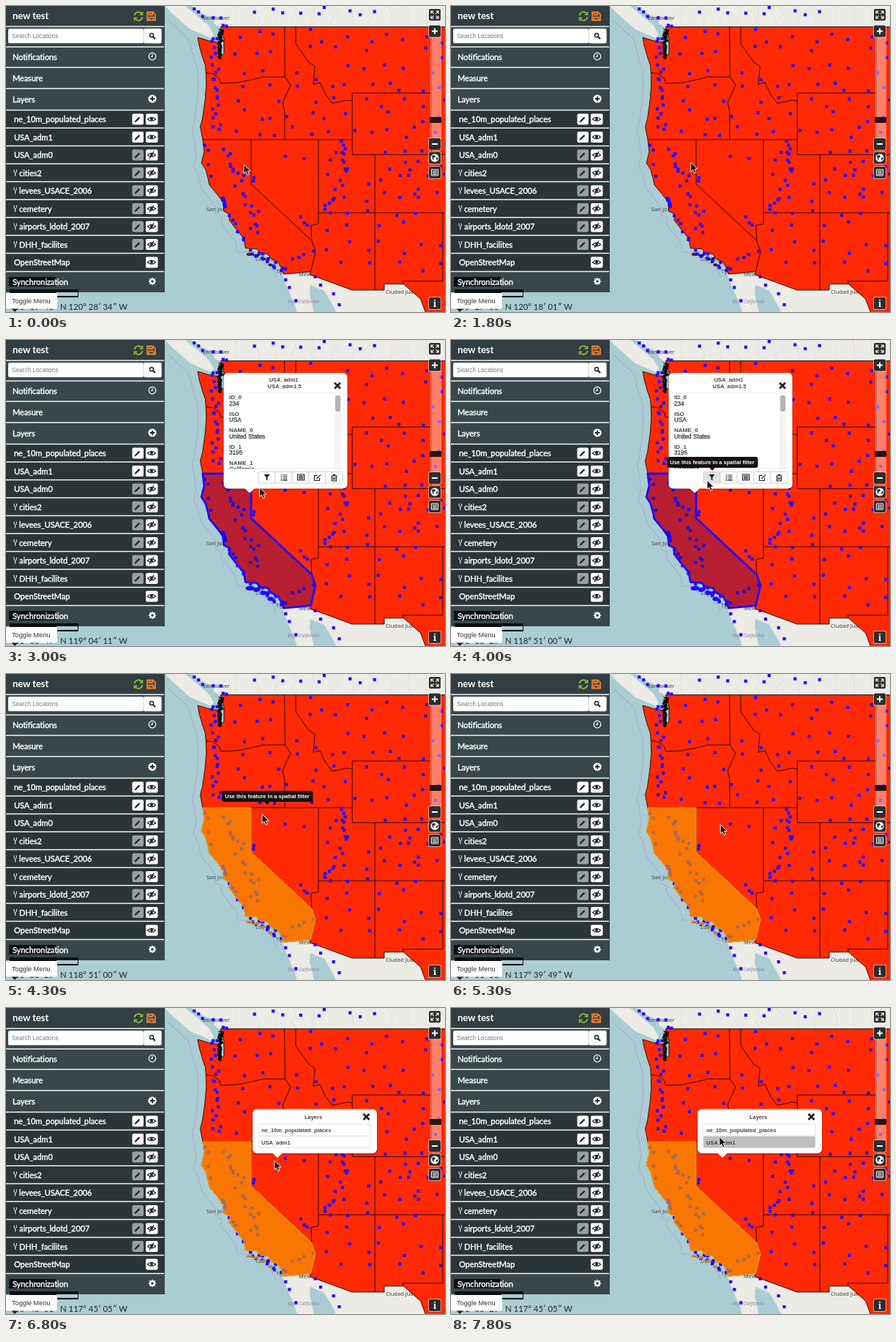
An HTML page for the animation above (8 s loop, 600 by 419 pixels).

```html
<!DOCTYPE html>
<html lang="en">
<head>
<meta charset="utf-8">
<title>Map client</title>
<style>
  html, body { margin: 0; width: 100%; height: 100%; overflow: hidden; background: #a9cdd2; }
  svg { display: block; position: absolute; left: 0; top: 0; }
  text { white-space: pre; }
  .ui { font: 11px Lato, sans-serif; letter-spacing: -.08px; fill: #fff; stroke: #fff; stroke-width: .4px; }
  .sm { font: 8.2px "Liberation Sans", Arial, sans-serif; fill: #333; }
  .val { stroke: #333; stroke-width: .25px; }
  .b { font: bold 7.5px "Liberation Sans", Arial, sans-serif; fill: #444; }
  .place { font: 7.5px "Noto Sans", sans-serif; fill: #444; }
  .line { fill: none; stroke: #1c0500; stroke-width: .9px; stroke-linejoin: round; }
  .ico { fill: none; stroke: #222; stroke-width: 1.2px; }
  .inv { stroke: #fff; }
</style>
</head>
<body>
<svg id="stage" width="600" height="419" viewBox="0 0 600 419"></svg>
<script>
const LOOP = 8000;

const path = (pts, attrs, close = true) =>
  `<path d="M${pts.join(' ')}${close ? 'Z' : ''}" ${attrs}/>`;
const rect = (x, y, w, h, fill, r = 0, more = '') =>
  `<rect x="${x}" y="${y}" width="${w}" height="${h}" rx="${r}" fill="${fill}" ${more}/>`;
const text = (x, y, s, cls, more = '') =>
  `<text x="${x}" y="${y}" class="${cls}" ${more}>${s}</text>`;
const at = (x, y, body) => `<g transform="translate(${x} ${y})">${body}</g>`;
const ico = (d, cls = '', more = '') => `<path d="${d}" class="ico ${cls}" ${more}/>`;
const hline = y => rect(0, y - .7, 216, 1.5, '#eef2f2');

// Web Mercator: degrees west and north to stage pixels
const merc = lat => Math.log(Math.tan(Math.PI / 4 + lat * Math.PI / 360));
const geo = pts => pts.map((v, i) => +(i % 2
  ? 183 + (merc(42) - merc(v)) * 884.6
  : 335 + (120 - v) * 15.44).toFixed(1));

let seed = 11;
const rnd = () => (seed = (seed * 16807) % 2147483647) / 2147483647;
const jitter = r => (rnd() + rnd() - 1) * r;

// ---------- map ----------
const northCoast = geo([122.7,49, 122.4,48.3, 122.4,47.4, 122.8,47.2, 122.9,48.1, 123.6,48.15, 124.72,48.38,
  124.6,47.9, 124.3,47.2, 124.05,46.7, 124,46.25, 123.97,45.5, 124.07,44.6, 124.3,43.4, 124.5,42.84, 124.28,42]);
const caCoast = geo([124.28,42, 124.15,41.2, 124.4,40.44, 124.02,40, 123.78,39.3, 123.7,38.95, 123,38.3,
  122.5,37.75, 122.4,37.1, 121.85,36.9, 121.95,36.5, 121.4,35.9, 120.65,35.15, 120.5,34.45,
  119.5,34.4, 119.2,34.1, 118.5,34.02, 118.35,33.75, 117.6,33.4, 117.25,32.85, 117.12,32.53]);
const caEast = geo([114.72,32.72, 114.5,33.5, 114.3,34.2, 114.63,35, 120,39, 120,42]);
const california = caCoast.concat(caEast);
const south = geo([117.12,32.53, 114.72,32.72, 114.81,32.5, 111.07,31.33, 108.21,31.33, 108.21,31.78, 106.5,31.78,
  105,30.65, 104.5,29.5, 102.7,29.5, 102.7,49]);
const borders = [
  [124,46.25, 123.4,46.2, 122.8,45.9, 122.7,45.6, 121.2,45.65, 119.3,45.93, 119,46, 117,46],
  [117.04,49, 117,46, 116.5,45.5, 117.2,44.4, 117.03,43.8, 117.03,42],
  [116.05,49, 116.05,48, 114.9,46.9, 114.35,46.65, 114.5,45.55, 113.9,45.65, 113.4,44.9, 112.8,44.35,
    111.5,44.55, 111.05,44.5],
  [124.28,42, 111.05,42, 111.05,45, 104.05,45, 104.05,49],
  [111.05,42, 111.05,41, 102,41], [104.05,45, 104.05,41],
  [114.04,42, 114.04,36.2, 114.7,36.1, 114.63,35], [114.04,37, 102,37],
  [109.05,41, 109.05,31.33], [103.04,37, 103.04,32, 106.6,32, 106.5,31.78]
].map(geo).concat([caEast]);

const islands = attrs => [0, 1, 2, 3].map(i =>
  `<ellipse cx="${333 + 9.5 * i}" cy="${340 + 1.6 * i * i}" rx="${4.2 - i * .5}" ry="1.5" ${attrs}/>`).join('');

// Towns: a loose lattice inland plus crowded corridors
const dot = (x, y) => rect((x - 2.1).toFixed(1), (y - 2.1).toFixed(1), 4.2, 4.2, '#2408ff');
const along = (x1, y1, x2, y2, n, spread) => {
  let s = '';
  for (let i = 0; i < n; i++) {
    const k = (i + rnd() * .6) / n;
    s += dot(x1 + (x2 - x1) * k + jitter(spread), y1 + (y2 - y1) * k + jitter(spread));
  }
  return s;
};
const lattice = () => {
  let s = '';
  for (let y = 42; y < 400; y += 22)
    for (let x = 318; x < 600; x += 25) {
      const px = x + jitter(13), py = y + jitter(12);
      const desert = px < 432 && py > 180;
      if (!desert && py < 340 + (px - 400) / 4 && rnd() < .82) s += dot(px, py);
    }
  return s;
};
const towns = () => lattice() +
  along(255, 4, 310, 28, 7, 6) + along(335, 8, 520, 8, 9, 7) +
  along(286, 38, 289, 178, 22, 8) + along(272, 185, 280, 240, 4, 4) +
  along(300, 195, 348, 312, 23, 9) + along(296, 262, 302, 277, 9, 2.5) + along(304, 284, 328, 325, 6, 4) +
  along(336, 332, 382, 364, 15, 6) + along(388, 348, 422, 338, 4, 4) +
  along(461, 185, 464, 232, 8, 3) + along(458, 240, 436, 284, 6, 6) + along(548, 212, 566, 270, 6, 8) +
  along(339, 234, 338, 241, 2, 0) + along(370, 205, 432, 210, 2, 2) + along(404, 290, 413, 304, 3, 3) +
  along(381, 372, 400, 410, 3, 3) + along(416, 370, 470, 412, 4, 6);

const sound = () => {
  let s = '';
  for (let k = 0; k < 9; k++) {
    const p = [];
    for (let y = 31; y < 72; y += 2.5)
      p.push((289 + (y < 48 ? 9 : 6) * rnd()).toFixed(1), (y + 2 * rnd()).toFixed(1));
    s += path(p, 'fill="none" stroke="#000" stroke-width=".9"', false);
  }
  return s;
};
const roads = () => {
  let s = '';
  for (let x = 315; x < 600; x += 26)
    s += path([x, 0, x + 12 * rnd(), 10, x - 8 + 16 * rnd(), 20, x + 8 * rnd(), 28],
      'fill="none" stroke="#dcdad4" stroke-width=".8"', false);
  return s;
};

const LAND = 'fill="#ecebe6" stroke="#d6d6d6" stroke-width=".6"';
const waters = northCoast.slice(12).concat(caCoast).map((v, i) => v + (i % 2 ? 5 : -11));
const map =
  rect(0, 0, 600, 419, '#a9cdd2') +
  path([222, 20, 249, 45].concat(waters), 'fill="none" stroke="#b3a5cb" stroke-width="1.2" opacity=".8" stroke-linejoin="round"', false) +
  path([217,0, 228,11, 252,32, 280,44, 284,39, 277,27, 262,14, 244,-1], LAND) +
  path([252,-1, 264,8, 284,17, 284,24, 292,29, 601,30, 601,-1], LAND) + roads() +
  path([378,367, 383,382, 395,410, 398,420, 421,420, 415,394, 416,382, 435,390, 448,412, 451,420, 601,420, 601,366], LAND) +
  text(287, 19, 'Vancouver', 'place', 'text-anchor="middle"') +
  text(274, 281, 'San Jose', 'place') + text(369, 366, 'Tijuana', 'place') +
  text(400, 370, 'Mexicali', 'place') + text(519, 394, 'Ciudad Juárez', 'place') +
  text(385, 407, 'Baja California', 'place', 'style="font-style:italic;font-size:6.5px;fill:#8c84a4"') +
  text(341, 349, 'Los Angeles', 'place') +
  path(northCoast.concat(caCoast, south), 'fill="#ff2a03" stroke="#1c0500" stroke-width=".9" stroke-linejoin="round"') +
  borders.map(b => path(b, 'class="line"', false)).join('') +
  islands('fill="#5a1a10" stroke="#111" stroke-width=".8"') + sound() + towns();

const highlight = (id, attrs) =>
  `<g id="${id}" stroke-linejoin="round" ${attrs}>${path(california, '')}${islands('')}</g>`;

// ---------- icons ----------
const pencil = ico('M4.5 10.5L10 5', '', 'style="stroke-width:2.4px"') + ico('M3.4 11.6L5 10');
const eye = ico('M2.5 7.5Q8 2.2 13.5 7.5Q8 12.3 2.5 7.5Z') + '<circle cx="8" cy="7.2" r="2" fill="#222"/>';
const fork = ico('M1 0V2Q1 4 2.6 5Q4.4 4 4.4 2V0M2.7 4.8V9', 'inv', 'style="stroke-width:1px"');
const cross = ico('M0 0L8 8M8 0L0 8', '', 'style="stroke-width:2.6px"');
const trash = 'M0 2H8M3 2V.4H5V2M1 2V9H7V2M3 4V7.4M5 4V7.4';
const list = 'M0 1H2M3 1H9M0 3.5H2M3 3.5H9M0 6H2M3 6H9M0 8.2H2M3 8.2H9';
const table = 'M0 0H9V8H0ZM1.5 2.2H7.5M1.5 4.2H7.5M1.5 6.2H7.5';
const gear = () => {
  let s = '<circle r="2.9" class="ico inv" style="stroke-width:2.2px"/>';
  for (let a = 0; a < 360; a += 45) s += `<path d="M3 0H5.3" class="ico inv" stroke-width="2" transform="rotate(${a})"/>`;
  return s;
};

// ---------- sidebar ----------
const branches = ['cities2', 'levees_USACE_2006', 'cemetery', 'airports_ldotd_2007', 'DHH_facilites'];
const layers = ['ne_10m_populated_places', 'USA_adm1', 'USA_adm0', ...branches, 'OpenStreetMap'];
const layerRow = (name, i) => {
  const y = 142.5 + i * 24.5, branch = branches.includes(name);
  const base = name === 'OpenStreetMap', on = i < 2 || base;
  return hline(y) + (branch ? at(10, y + 8, fork) : '') + text(branch ? 18 : 11, y + 16.5, name, 'ui') +
    (base ? '' : at(172.5, y + 5, rect(0, 0, 15.5, 15, on ? '#fff' : '#9b9f9f', 2) + pencil)) +
    at(191, y + 5, rect(0, 0, 16.5, 15, '#fff', 2) + eye + (on ? '' : ico('M5 12.5L11 2.5')));
};
const sidebar =
  rect(0, 0, 217, 392, '#39474a') + rect(0, 0, 217, 29, '#323e41') + rect(0, 142, 217, 221, '#2b3437') +
  text(9, 18, 'new test', 'ui', 'style="font-size:13px;font-weight:bold;stroke:none"') +
  at(181, 14, ico('M-5.5 -1A5.5 5.5 0 0 1 4 -4M5.5 1A5.5 5.5 0 0 1 -4 4M5.5 -6V-2.4H1.8M-5.5 6V2.4H-1.8', '',
    'style="stroke:#8fc63d;stroke-width:1.7px"')) +
  at(192, 7.5, ico('M1 1H9L12 4V12H1ZM3.5 1V4.5H8V1M3.5 12V8H9.5V12', '', 'style="stroke:#f08030;stroke-width:1.8px"')) +
  rect(3, 31, 185, 20, '#fff', 2) + text(8, 44, 'Search Locations', 'sm', 'style="fill:#777"') +
  rect(188, 31, 24.5, 20, '#fff', 2, 'stroke="#bbb" stroke-width=".7"') +
  at(199, 40, '<circle r="2.6" class="ico" style="stroke-width:1.5px"/>' + ico('M2 2L5 5', '', 'style="stroke-width:1.9px"')) +
  [28, 56, 84, 113, 363.5].map(hline).join('') +
  ['Notifications', 'Measure', 'Layers'].map((s, i) => text(9, 74 + 29 * i, s, 'ui')).join('') +
  at(200, 69, '<circle r="4.8" class="ico inv"/>' + ico('M0 -3V.5H-2.4', 'inv')) +
  at(200, 127, '<circle r="5.6" fill="#fff"/>' + ico('M-3.2 0H3.2M0 -3.2V3.2', '', 'style="stroke-width:1.8px"')) +
  layers.map(layerRow).join('') +
  rect(4, 371, 64, 13, '#0b0f10', 1) + rect(5, 388, 94, 11, '#0b0f10', 1) + rect(69, 392, 29, 5, '#a9cdd2') +
  text(9, 382, 'Synchronization', 'ui') + at(200, 377, gear()) +
  text(166, 416, '', '', 'id="coords" text-anchor="end" style="font:11.3px Lato,sans-serif;fill:#222"') +
  path([6, 413, 18, 413, 12, 419], 'fill="#222"') +
  rect(0, 393, 70, 21.5, '#fff', 2) + text(8, 406.5, 'Toggle Menu', 'sm', 'style="font-size:9.2px"');

// ---------- map controls ----------
const key = (y, body) => at(578, y, rect(-1, -1, 18, 18, '#fff', 3, 'opacity=".55"') +
  rect(0, 0, 16, 16, '#2d2d2d', 2) + body);
const thick = 'style="stroke-width:2px"';
const controls =
  rect(580, 42, 15, 140, '#fff', 0, 'opacity=".4"') +
  key(4, ico('M3 6.5V3H6.5M9.5 3H13V6.5M13 9.5V13H9.5M6.5 13H3V9.5M3 3L6.6 6.6M13 3L9.4 6.6M13 13L9.4 9.4M3 13L6.6 9.4', 'inv')) +
  key(26.5, ico('M4 8H12M8 4V12', 'inv', thick)) + rect(579, 152, 16, 8, '#241512', 1) +
  key(181, ico('M4 8H12', 'inv', thick)) +
  key(200, '<circle cx="8" cy="8" r="5.6" fill="#fff"/><path d="M4 5L8 4L9 7L6 8L7 11L5 10ZM10 8L13 7L12 10L10 11Z" fill="#2d2d2d"/>') +
  key(220, at(3.5, 4, ico(table, 'inv', 'style="stroke-width:1px"'))) +
  key(399, text(8, 12.5, 'i', '', 'text-anchor="middle" style="font:bold 12px Noto Serif,serif;fill:#fff"'));

// ---------- popups ----------
const balloon = (x, y, w, h, tip) =>
  rect(x - 1, y, w + 2, h + 2, '#000', 7, 'opacity=".18"') + rect(x, y, w, h, '#fff', 6) +
  path([tip - 7, y + h - .5, tip + 7, y + h - .5, tip, y + h + 6], 'fill="#fff"');

const fields = { ID_0: '234', ISO: 'USA', NAME_0: 'United States', ID_1: '3195', NAME_1: 'California' };
const tools = ['M0 0H8L5 4V8.5L3 7V4Z', list, table, 'M7 5V8.5H0V1.5H4M3 6L8.5 .6', trash];
const infoPopup = '<g id="info">' + balloon(297.5, 45, 169, 158.5, 333) +
  text(379.5, 57, 'USA_adm1', 'b', 'text-anchor="middle"') +
  text(380.5, 66, 'USA_adm1.5', 'b', 'text-anchor="middle"') + at(449, 58.5, cross) +
  '<clipPath id="clip"><rect x="300" y="72" width="160" height="104"/></clipPath><g clip-path="url(#clip)">' +
  Object.entries(fields).map(([k, v], i) =>
    text(305, 81 + i * 22.5, k, 'b', 'style="font-size:8px"') +
    text(305, 89.6 + i * 22.5, v, 'sm val')).join('') + '</g>' +
  rect(302, 72.5, 157, .6, '#ddd') + rect(302, 176, 157, .6, '#ddd') +
  rect(449, 74, 9, 102, '#f4f4f4') + rect(450, 76, 7, 22, '#b4b4b4', 3) +
  tools.map((d, i) => rect(345 + i * 23, 180.5, 23, 15.5, '#fff', 1, `stroke="#ccc" stroke-width=".8" ${i ? '' : 'id="filter"'}`) +
    at(352.5 + i * 23, 184, ico(d, '', i ? '' : 'style="fill:#222;stroke:none"'))).join('') + '</g>';

const option = (y, s, id) => rect(345, y, 153, 16, '#fff', 2, `id="${id}" stroke="#ddd" stroke-width=".8"`) +
  text(349, y + 11.3, s, 'b');
const layerPopup = '<g id="pick">' + balloon(337, 138.5, 170, 60.5, 371) +
  text(420, 152, 'Layers', 'b', 'text-anchor="middle"') + at(488.5, 145, cross) +
  option(159, layers[0], 'first') + option(175.5, layers[1], 'second') + '</g>';

const tooltip = '<g id="tip">' + rect(295, 160, 124.5, 15, '#161010', 3) +
  path([353, 174.5, 361, 174.5, 357, 179], 'fill="#161010"') +
  text(357, 170.3, 'Use this feature in a spatial filter', 'b', 'text-anchor="middle" style="fill:#fff"') + '</g>';

const pointer = '<path id="pointer" d="M0 0V12.4L2.9 9.8L5 14.4L7.3 13.4L5.3 9H9.2Z" fill="#111" stroke="#fff" stroke-width=".9"/>';

const $ = id => document.getElementById(id);
$('stage').innerHTML = map +
  highlight('chosen', 'fill="#0000a8" fill-opacity=".28" stroke="#1c0cff" stroke-width="2.8"') +
  highlight('area', 'fill="#f5a500" fill-opacity=".62" stroke="#ffb020" stroke-width="1"') +
  controls + infoPopup + layerPopup + tooltip + sidebar + pointer;

// ---------- timeline ----------
// time, then pointer offset in screen pixels from its first place
const moves = [
  [0, 0, 0], [300, 4.5, -1.5], [500, 0, 8], [1800, 2, -2], [2800, 12, -7], [3000, 16, -11],
  [3500, 18.5, -18.5], [4800, 28, -16], [5000, 31, -14], [5300, 32, -8], [5800, 31, -6],
  [7500, 31, -10], [7800, 31, -30]
];
const SCALE = 1.35;
const spans = { info: [2000, 4300], chosen: [2300, 4300], tip: [3500, 4500], area: [4300, LOOP], pick: [6800, LOOP] };

const dms = deg => {
  const s = Math.round(deg * 3600), two = v => String(v).padStart(2, '0');
  return `${Math.floor(s / 3600)}° ${two(Math.floor(s / 60) % 60)}′ ${two(s % 60)}″`;
};
const coords = (dx, dy) => {
  const world = 4096 / (2 * Math.PI);
  const lat = Math.atan(Math.sinh(merc(40.33) - dy / world)) * 180 / Math.PI;
  return `${dms(lat)} N ${dms(120.4761 - dx * 360 / 4096)} W`;
};

function draw(t) {
  const [, dx, dy] = moves.filter(m => m[0] <= t).pop();
  $('pointer').setAttribute('transform', `translate(${325 + dx * SCALE} ${217 + dy * SCALE})`);
  $('coords').textContent = coords(dx, Math.max(dy, -18.5));
  for (const id in spans)
    $(id).style.display = t >= spans[id][0] && t < spans[id][1] ? '' : 'none';
  $('filter').setAttribute('fill', t >= 3500 ? '#e2e2e2' : '#fff');
  $('second').setAttribute('fill', t >= 7800 ? '#bebebe' : '#fff');
}
const start = performance.now();
function tick() {
  draw((performance.now() - start) % LOOP);
  requestAnimationFrame(tick);
}
tick();
</script>
</body>
</html>
```
